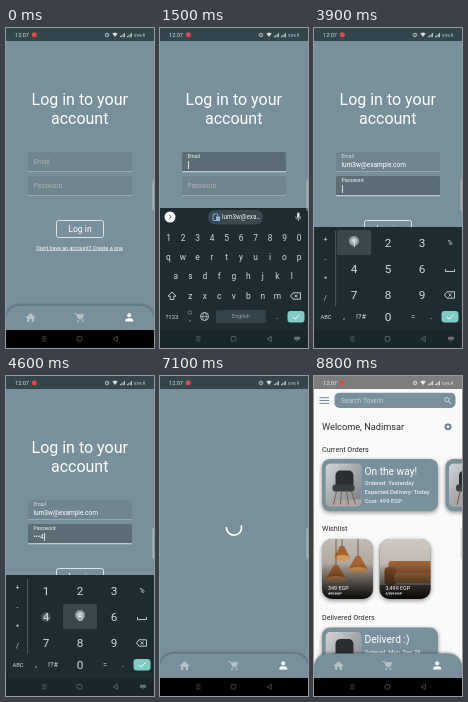
These frames come from a looping animation (148x320 px, 8.9 s). An HTML page with a canvas:

```html
<!DOCTYPE html>
<html lang="en">
<head>
<meta charset="utf-8">
<title>Log in</title>
<style>
html, body { margin: 0; width: 100%; height: 100%; overflow: hidden; background: #78909c; }
canvas { display: block; width: 148px; height: 320px; }
</style>
</head>
<body>
<canvas id="stage"></canvas>
<script>
const W = 148, H = 320, LOOP = 8900, TAU = Math.PI * 2;
const SLATE = '#78909c', KEYS = '#1e2b31', KEY_INK = '#d3dbdf', TEAL = '#80cbc4';
const EMAIL = 'lum3w@example.com';
const LOADING = 6900, HOME = 7900;
const canvas = document.getElementById('stage');
const ctx = canvas.getContext('2d');
const scale = window.devicePixelRatio || 1;
canvas.width = W * scale;
canvas.height = H * scale;

const clamp = x => Math.max(0, Math.min(1, x));
const ramp = (t, from, to) => clamp((t - from) / (to - from));
const ease = x => 1 - (1 - x) ** 3;
const mix = (a, b, k) => a + (b - a) * k;

function text(str, x, y, size, color = '#fff', align = 'left') {
  ctx.font = `${size}px Roboto, sans-serif`;
  ctx.fillStyle = color;
  ctx.textAlign = align;
  ctx.textBaseline = 'alphabetic';
  ctx.fillText(str, x, y + size * 0.355);
  return ctx.measureText(str).width;
}
function rect(x, y, w, h, color) {
  ctx.fillStyle = color;
  ctx.fillRect(x, y, w, h);
}
function round(x, y, w, h, r, color) {
  ctx.beginPath();
  ctx.roundRect(x, y, w, h, r);
  ctx.fillStyle = color;
  ctx.fill();
}
function outline(x, y, w, h, r, color, width = 0.8) {
  ctx.beginPath();
  ctx.roundRect(x, y, w, h, r);
  ctx.strokeStyle = color;
  ctx.lineWidth = width;
  ctx.stroke();
}
function disc(x, y, r, color) {
  ctx.beginPath();
  ctx.arc(x, y, r, 0, TAU);
  ctx.fillStyle = color;
  ctx.fill();
}
function ring(x, y, r, color, width = 0.8, from = 0, to = TAU) {
  ctx.beginPath();
  ctx.arc(x, y, r, from, to);
  ctx.strokeStyle = color;
  ctx.lineWidth = width;
  ctx.stroke();
}
function path(points, color, width = 0, closed = !width) {
  ctx.beginPath();
  for (let i = 0; i < points.length; i += 2) ctx.lineTo(points[i], points[i + 1]);
  if (closed) ctx.closePath();
  if (width) {
    ctx.strokeStyle = color;
    ctx.lineWidth = width;
    ctx.stroke();
  } else {
    ctx.fillStyle = color;
    ctx.fill();
  }
}
function gradient(x0, y0, x1, y1, from, to) {
  const g = ctx.createLinearGradient(x0, y0, x1, y1);
  g.addColorStop(0, from);
  g.addColorStop(1, to);
  return g;
}
function shadow(blur, y, draw) {
  ctx.save();
  ctx.shadowColor = 'rgba(0,0,0,.45)';
  ctx.shadowBlur = blur * scale;
  ctx.shadowOffsetY = y * scale;
  draw();
  ctx.restore();
}
function touch(x, y, alpha = 1) {
  ctx.globalAlpha = alpha;
  disc(x, y, 5, 'rgba(205,214,218,.6)');
  disc(x, y, 2.8, 'rgba(230,235,238,.5)');
  ctx.globalAlpha = 1;
}

function statusBar(home) {
  const ink = home ? '#f2f2f2' : '#d5dbde';
  rect(0, 0, W, 13, home ? '#7d7d7d' : '#35454c');
  text('12:07', 9, 7, 5.6, ink);
  disc(28.3, 6.8, 2.5, '#e04a48');
  ring(101, 7, 1.8, ink, 0.7);
  path([101, 5.8, 101, 7.2, 102, 7.2], ink, 0.5);
  path([106.3, 5.6, 109, 4.5, 111.7, 5.6, 109, 9], ink);
  for (const x of [114, 121]) {
    for (let i = 0; i < 4; i++) rect(x + i * 1.4, 8 - i, 0.8, 1.2 + i, ink);
  }
  text('59%', 128, 7, 4.4, ink);
  path([138.4, 5, 137.2, 7.2, 138.6, 7, 137.8, 9], ink, 0.6);
}

function systemBar(withKeyboard) {
  const ink = withKeyboard ? '#667177' : '#565656';
  rect(0, 302, W, 18, withKeyboard ? '#1a262b' : '#000');
  for (const y of [308.8, 310.8, 312.8]) path([36, y, 40.6, y], ink, 0.7);
  outline(71.2, 308.5, 4.6, 4.6, 1, ink);
  path([111.3, 308.3, 111.3, 313.3, 107.2, 310.8], ink, 0.8, true);
  if (withKeyboard) {
    round(134, 308.8, 6, 3, 0.5, ink);
    path([135.8, 312.6, 138.2, 312.6, 137, 313.8], ink);
  }
}

function appNav() {
  shadow(3, -0.6, () => round(0, 277.5, W, 25, [14, 14, 0, 0], SLATE));
  const ink = '#b5c2c8';
  path([19.3, 290, 24.5, 285, 29.7, 290, 28, 290, 28, 294, 25.8, 294, 25.8, 291, 23.2, 291, 23.2, 294, 21, 294, 21, 290], ink);
  path([68.5, 285.5, 70.2, 285.5, 73, 291, 77, 291], ink, 1);
  path([70.5, 286.2, 78.3, 286.2, 76.5, 290, 72.3, 290], ink);
  disc(72, 293.3, 1, ink);
  disc(76.6, 293.3, 1, ink);
  disc(123.2, 287.3, 2, '#fff');
  round(119.2, 290.2, 8, 3.4, [3, 3, 0, 0], '#fff');
}

function field(y, label, value, focus, lift, cursor) {
  round(22, y, 104, 20, [2, 2, 0, 0], `rgba(0,0,0,${mix(0.075, 0.25, focus)})`);
  rect(22, y + 19.3, 104, focus ? 0.9 : 0.7, focus ? '#e4eaec' : '#a9b8bf');
  const ink = Math.round(mix(174, 245, Math.max(focus, lift * 0.65)));
  text(label, 27.5, y + mix(10, 4.7, lift), mix(6.5, 5, lift), `rgb(${ink},${ink + 5},${ink + 8})`);
  const width = text(value, 27.5, y + 13, 6.5);
  if (cursor) rect(28 + width, y + 9, 0.8, 8, '#fff');
}

// Keys 1 to 8 are tapped every 200 ms; each digit appears halfway through its tap... 
const pressedDigit = t => t >= 3800 && t < 5400 ? Math.floor((t - 3800) / 200) + 1 : 0;

function typed(t) {
  const count = Math.min(8, Math.floor((t - 3800) / 200));
  if (count < 1) return '';
  return t >= 5500 ? '•'.repeat(8) : '•'.repeat(count - 1) + count;
}

function loginPage(t) {
  rect(0, 0, W, H, SLATE);
  text('Log in to your', 73.7, 71.5, 16, '#fff', 'center');
  text('account', 73.7, 90.5, 16, '#fff', 'center');
  const onEmail = t >= 500 && t < 2700;
  const onPassword = t >= 2700 && t < 5600;
  const cursor = Math.floor(t / 500) % 2 === 1;
  field(124, 'Email', t >= 1800 ? EMAIL : '', +onEmail, ramp(t, 400, 700), onEmail && cursor);
  field(148, 'Password', typed(t), +onPassword, ramp(t, 2650, 2950), onPassword && (cursor || pressedDigit(t)));
  outline(50.5, 192.5, 47, 17, 2, '#e8edef', 0.9);
  text('Log in', 74, 201, 8.6, '#fff', 'center');
  const width = text("Don't have an account? Create a one", 73.5, 219.8, 5.4, '#fff', 'center');
  rect(73.5 - width / 2, 222.4, width, 0.5, '#fff');
}

function backspace(y) {
  path([130.5, y, 133, y - 3.2, 140.5, y - 3.2, 140.5, y + 3.2, 133, y + 3.2], KEY_INK, 0.9, true);
  path([134.5, y - 1.5, 137.7, y + 1.5], KEY_INK, 0.8);
  path([137.7, y - 1.5, 134.5, y + 1.5], KEY_INK, 0.8);
}
function enterKey() {
  round(127.5, 283, 17, 11.5, 3, TEAL);
  path([132.8, 288.8, 135.2, 291, 139.5, 286.6], '#fff', 1);
}
const key = (str, x, y, size = 8.4) => text(str, x, y, size, KEY_INK, 'center');

function letterKeys() {
  const rows = [['1234567890', 8.5, 210], ['qwertyuiop', 8.5, 229], ['asdfghjkl', 15.8, 248.5], ['zxcvbnm', 30.3, 268]];
  for (const [chars, x, y] of rows) [...chars].forEach((c, i) => key(c, x + i * 14.5, y));
  path([12, 264, 16, 268.2, 13.8, 268.2, 13.8, 271.5, 10.2, 271.5, 10.2, 268.2, 8, 268.2], KEY_INK, 0.9, true);
  backspace(268);
  key('?123', 12, 288.5, 6);
  key(',', 30, 290, 8);
  ring(30, 284.5, 1.8, '#9aa5aa', 0.6);
  ring(44.5, 288.5, 4, KEY_INK);
  path([40.5, 288.5, 48.5, 288.5], KEY_INK, 0.6);
  ctx.beginPath();
  ctx.ellipse(44.5, 288.5, 1.8, 4, 0, 0, TAU);
  ctx.stroke();
  round(56, 282, 50, 13, 2, '#35434a');
  text('English', 81, 288.5, 5.5, '#98a4aa', 'center');
  key('.', 117, 288);
  enterKey();
}

function digitSpot(n) {
  return [40 + (n - 1) % 3 * 34, 215 + Math.floor((n - 1) / 3) * 26];
}
function digitKeys(t) {
  rect(21.2, 203, 0.9, 75, '#56636a');
  ['+', '-', '*', '/'].forEach((c, i) => key(c, 11.5, 212 + i * 19.3, 7));
  const down = pressedDigit(t);
  if (down) {
    const [x, y] = digitSpot(down);
    round(x - 17, y - 13, 34, 25, 2, '#3a474d');
  }
  for (let n = 1; n < 10; n++) key(n, ...digitSpot(n), 11.8);
  key('0', 74, 289, 11.8);
  key('%', 136, 215, 7);
  path([131.5, 241, 131.5, 243.5, 140.5, 243.5, 140.5, 241], KEY_INK, 0.9);
  backspace(267);
  key('ABC', 12, 288.5, 5.8);
  key(',', 30, 288);
  key('!?#', 47, 288.5, 7.5);
  key('=', 99, 288.5, 7.5);
  key('.', 117, 288);
  enterKey();
}

function suggestions(t) {
  rect(0, 180, W, 20, KEYS);
  disc(10, 189, 5.5, '#fff');
  path([9, 186.8, 11.2, 189, 9, 191.2], '#37474f', 0.9);
  round(137, 184.5, 2.6, 5.5, 1.3, KEY_INK);
  ring(138.3, 188.6, 2.6, KEY_INK, 0.7, 0, Math.PI);
  rect(138, 191, 0.7, 2, KEY_INK);
  if (t < 1300 || t >= 1900) return;
  round(48, 182, 55, 14.5, 7, t >= 1700 ? '#506069' : '#3a484f');
  outline(53, 186, 5, 6.5, 0.5, '#8fb7e0', 0.9);
  rect(56, 188.5, 4, 4.5, '#8fb7e0');
  text('lum3w@exa…', 62, 189.2, 6.3, '#edf1f2');
}

function keyboard(t) {
  const shown = ease(ramp(t, 600, 1000)) * (1 - ramp(t, 5600, 5900) ** 2);
  if (!shown) return;
  if (t >= 2800 && t < 2900) rect(0, 181, W, 18, '#f8f9f9');
  if (t >= 5700) rect(0, 199, W, 103, '#f8f9f9');
  ctx.save();
  ctx.translate(0, (1 - shown) * 124);
  rect(0, 199, W, 121, KEYS);
  if (t < 2800) suggestions(t);
  if (t < 3500) letterKeys();
  else digitKeys(t);
  ctx.restore();
}

function loginTouches(t) {
  if (t >= 400 && t < 600) touch(75, 134, t < 500 ? 1 : 0.6);
  if (t >= 1700 && t < 1900) touch(78, 189, t < 1800 ? 1 : 0.6);
  if (t >= 2700 && t < 2900) touch(89, 158.5);
  if (t >= 3300 && t < 3500) touch(12, 288);
  const down = pressedDigit(t);
  if (down) {
    const [x, y] = digitSpot(down);
    touch(x, y - 2);
    if (down > 1 && t % 200 === 0) touch(...digitSpot(down - 1), 0.35);
  }
  if (t >= 5500 && t < 5700) touch(44, 184.5);
  if (t >= 6700) touch(74, 201);
}

function spinnerPage(t) {
  rect(0, 0, W, H, SLATE);
  const turn = (t - 7100) / 1000 * TAU;
  const sweep = 3.5 + 1.1 * Math.sin((t - 7100) / 1333 * TAU);
  ring(74, 151.5, 7.6, '#fff', 1.6, turn - 0.3, turn - 0.3 + sweep);
}

function chair() {
  rect(0, 0, 36, 44, gradient(0, 0, 36, 30, '#d3d5d7', '#85898d'));
  rect(0, 36, 36, 8, '#a9a6a3');
  round(10, 7, 18, 18, 5, '#2b2e31');
  round(7, 21, 22, 7, 3, '#3a3d40');
  for (const [a, b] of [[11, 8], [16, 15], [21, 23], [26, 30]]) path([a, 28, b, 41], '#7d5f45', 1);
}
function fadeToDark() {
  rect(0, 0, 52, 60, gradient(0, 24, 0, 58, 'rgba(0,0,0,0)', 'rgba(0,0,0,.88)'));
}
function lamps() {
  rect(0, 0, 52, 60, gradient(0, 0, 0, 60, '#c4bdb5', '#94877b'));
  for (const [x, y, r] of [[20, 15, 8], [36, 27, 10], [14, 36, 10]]) {
    rect(x - 0.3, 0, 0.6, y, '#3a2c22');
    path([x - 2, y - r, x + 2, y - r, x + r, y + 4, x - r, y + 4], '#a4632f');
    ctx.beginPath();
    ctx.ellipse(x, y + 4, r, 3, 0, 0, TAU);
    ctx.fillStyle = '#d39a5c';
    ctx.fill();
  }
  fadeToDark();
}
function sofa() {
  rect(0, 0, 52, 60, gradient(0, 0, 0, 50, '#cfcac3', '#aea69c'));
  rect(0, 46, 52, 14, '#6d6055');
  round(9, 22, 46, 17, 3, '#9a6338');
  round(5, 28, 12, 18, 4, '#85502b');
  round(15, 34, 40, 10, 2, '#ad7445');
  fadeToDark();
}
function photo(x, y, w, h, r, draw, alpha) {
  round(x, y, w, h, r, '#90a4ae');
  ctx.save();
  ctx.globalAlpha = alpha;
  ctx.beginPath();
  ctx.roundRect(x, y, w, h, r);
  ctx.clip();
  ctx.translate(x, y);
  draw();
  ctx.restore();
}

function orderCard(x, y, alpha, title = '', lines = []) {
  shadow(4, 1.5, () => round(x, y, 116, 52, 8, SLATE));
  photo(x + 3.5, y + 4.5, 36, 43, 5, chair, alpha);
  text(title, x + 42.5, y + 12.3, 10.2);
  lines.forEach((line, i) => text(line, x + 42.5, y + 24.3 + i * 9, 5.9));
}
function wish(x, draw, price, old, alpha) {
  shadow(4, 1.5, () => round(x, 163, 51, 60, 10, SLATE));
  photo(x, 163, 51, 60, 10, draw, alpha);
  text(price, x + 6, 212, 5.4);
  const width = text(old, x + 6, 217.6, 3.6, '#dedede');
  rect(x + 6, 217.4, width, 0.4, '#dedede');
}

function homePage(t) {
  const loaded = ramp(t, 8400, 8800);
  const ink = '#2b2b2b';
  rect(0, 0, W, H, '#fafafa');
  for (const y of [21.3, 24.1, 26.9]) rect(5.5, y, 9.5, 0.9, '#607d8b');
  round(20.5, 16.8, 121, 15.2, 5, SLATE);
  text('Search Tovelin', 27, 24.5, 6.6, '#c3ced3');
  ring(133, 23.6, 2.2, '#d9e1e4', 0.9);
  path([134.6, 25.3, 137, 27.7], '#d9e1e4', 1);
  text('Welcome, Nadimsar', 8, 50.6, 9.2, ink);
  for (let i = 0; i < 8; i++) disc(134 + 2.9 * Math.cos(i * TAU / 8), 50.8 + 2.9 * Math.sin(i * TAU / 8), 0.9, '#607d8b');
  ring(134, 50.8, 2.2, '#607d8b', 1.4);
  text('Current Orders', 8, 73, 7.2, ink);
  orderCard(8, 83, loaded, 'On the way!', ['Ordered: Yesterday', 'Expected Delivery: Today', 'Cost: 499 EGP']);
  orderCard(131.5, 83, loaded);
  text('Wishlist', 8, 152.3, 7.2, ink);
  wish(8, lamps, '349 EGP', '499 EGP', loaded);
  wish(65.5, sofa, '3,499 EGP', '4,999 EGP', loaded);
  text('Delivered Orders', 8, 241, 7.2, ink);
  orderCard(8, 251.5, loaded, 'Deliverd :)', ['Ordered: Mon, Sep 26']);
}

function draw(t) {
  const home = t >= HOME;
  ctx.setTransform(scale, 0, 0, scale, 0, 0);
  if (t < LOADING) loginPage(t);
  else if (home) homePage(t);
  else spinnerPage(t);
  appNav();
  if (t < LOADING) {
    keyboard(t);
    loginTouches(t);
  }
  round(146.3, 152, 3, 31, 1.5, home ? '#dcdcdc' : 'rgba(190,200,185,.55)');
  statusBar(home);
  systemBar(t >= 700 && t < 5900);
}

const start = performance.now();
function frame() {
  const t = (performance.now() - start) % LOOP;
  draw(Math.floor(t / 100) * 100);
  requestAnimationFrame(frame);
}
frame();
</script>
</body>
</html>
```
